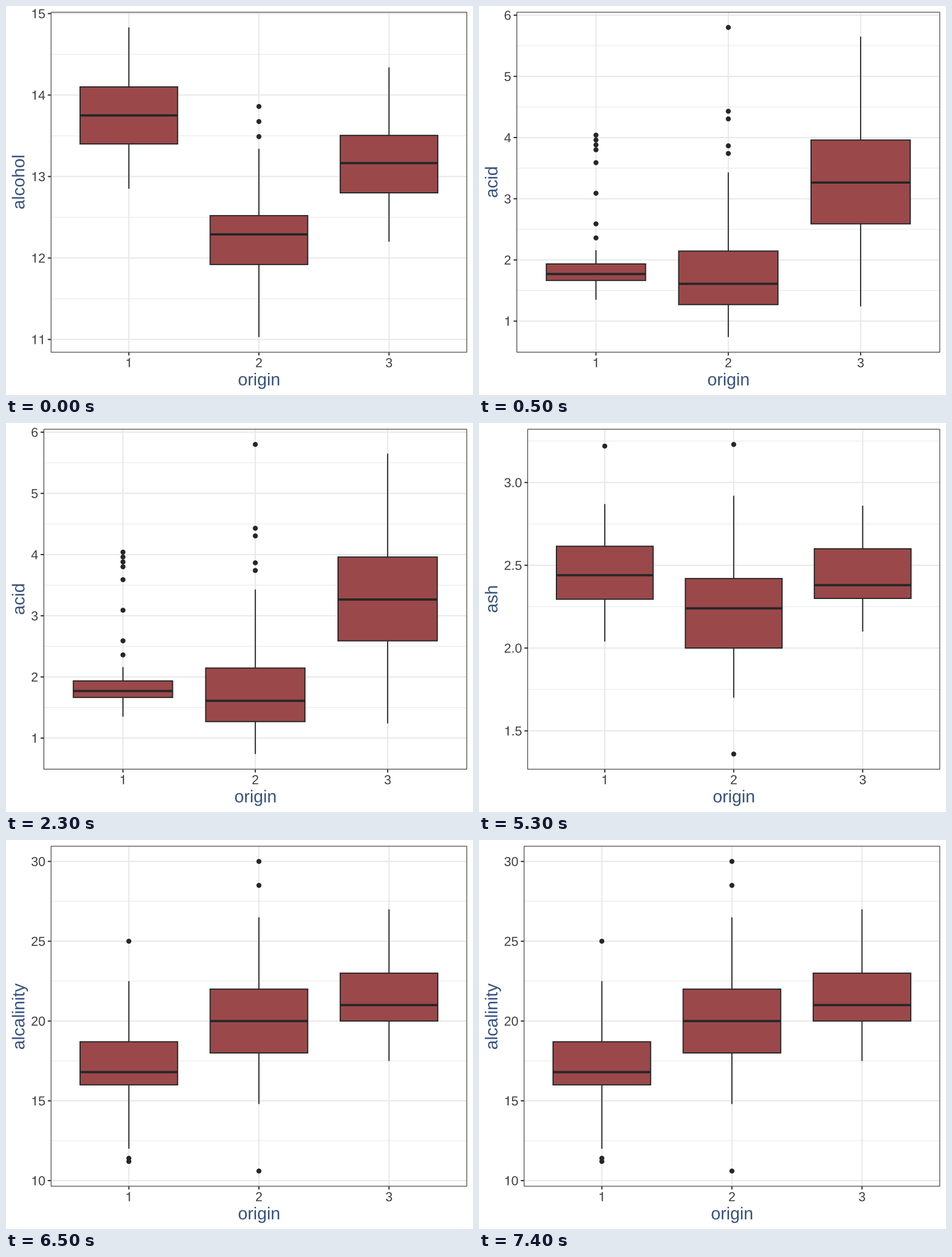
Recreate the animation shown at these times as a matplotlib script. Size 820 px wide and 683 px high, loop 8000 ms.

```python
import matplotlib.pyplot as plt
import numpy as np
from matplotlib.animation import FuncAnimation
from matplotlib.patches import Circle, PathPatch, Rectangle
from matplotlib.path import Path
from matplotlib.textpath import TextPath
from matplotlib.transforms import Affine2D

W, H, DPI = 820, 683, 64
PT = 72 / DPI  # points per pixel
TOP, BOTTOM, RIGHT = 10.45, 608.4, 809.55
LABEL_X, LABEL_GAP, TICK = 43.9, 9.4, 5.2
THIN, LINE, THICK = 1.0, 2.0, 4.0
LABEL_SIZE, TITLE_SIZE = 22.8, 30.4
DIGIT, DOT = 0.556, 0.278  # advance widths in em

INK, FILL = "#262727", "#9b484a"
GRID, LABEL, TITLE = "#e7e7e7", "#404040", "#36527f"

STEP, HOLD, FIRST, LOOP = 500, 3000, 500, 8000

# A "1" without a foot, in em units
ONE = Path([(.10, .50), (.27, .50), (.27, 0), (.36, 0),
            (.36, .71), (.29, .71), (.25, .58), (.10, .565)])


def box(low, q1, median, q3, high, *outliers):
    return low, q1, median, q3, high, outliers


# Title, gap between ticks, one box per origin
CHARTS = [
    ("alcohol", 1,
     box(12.85, 13.4, 13.75, 14.1, 14.83),
     box(11.03, 11.92, 12.29, 12.52, 13.34, *np.linspace(13.49, 13.86, 3)),
     box(12.2, 12.8, 13.165, 13.505, 14.34)),
    ("acid", 1,
     box(1.35, 1.665, 1.77, 1.935, 2.16, 2.36,
         *np.linspace(2.59, 3.59, 3), *np.linspace(3.8, 4.04, 4)),
     box(0.74, 1.27, 1.61, 2.145, 3.43, 3.74, 3.865, 4.305, 4.43, 5.8),
     box(1.24, 2.59, 3.265, 3.96, 5.65)),
    ("ash", 0.5,
     box(2.04, 2.295, 2.44, 2.615, 2.87, 3.22),
     box(1.7, 2, 2.24, 2.42, 2.92, 1.36, 3.23),
     box(2.1, 2.3, 2.38, 2.6, 2.86)),
    ("alcalinity", 5,
     box(12, 16, 16.8, 18.7, 22.5, 11.2, 11.4, 25),
     box(14.8, 18, 20, 22, 26.5, 10.6, 28.5, 30),
     box(17.5, 20, 21, 23, 27)),
]

fig = plt.figure(figsize=(W / DPI, H / DPI), dpi=DPI, facecolor="white")
ax = fig.add_axes([0, 0, 1, 1])


def line(x0, y0, x1, y1, color=INK, width=LINE):
    # The same zorder as patches, so that drawing order decides
    ax.plot([x0, x1], [y0, y1], color=color, lw=width * PT,
            solid_capstyle="butt", snap=False, zorder=1)


def rect(x0, y0, x1, y1, width, fill="none"):
    ax.add_patch(Rectangle((x0, y0), x1 - x0, y1 - y0, fc=fill, ec=INK,
                           lw=width * PT, joinstyle="miter", snap=False))


def shape(path, x, y, size, color, turn=0):
    place = Affine2D().scale(size, -size).rotate_deg(turn).translate(x, y)
    ax.add_patch(PathPatch(place.transform_path(path), fc=color, lw=0, snap=False))


def glyphs(text):
    return TextPath((0, 0), text, size=1, prop={"family": "Liberation Sans"})


def number_width(text):
    return sum(DOT if c == "." else DIGIT for c in text) * LABEL_SIZE


def number(text, x, y):
    for c in text:
        shape(ONE if c == "1" else glyphs(c), x, y, LABEL_SIZE, LABEL)
        x += number_width(c)


def title(text, x, y, turn=0):
    path = glyphs(text)
    extent = path.get_extents()
    half = (extent.x0 + extent.x1) / 2 * TITLE_SIZE
    if turn:
        y += half
    else:
        x -= half
    shape(path, x, y, TITLE_SIZE, TITLE, turn)


def draw_chart(name, gap, *boxes):
    values = [v for b in boxes for v in (b[0], b[4], *b[5])]
    pad = (max(values) - min(values)) * 0.05
    low, high = min(values) - pad, max(values) + pad
    ticks = np.arange(np.ceil(low / gap), high / gap) * gap
    labels = [f"{t:.{int(gap < 1)}f}" for t in ticks]

    left = LABEL_X + number_width(labels[0]) + LABEL_GAP
    unit = (RIGHT - left) / 3.2
    centers = left + unit * np.array([0.6, 1.6, 2.6])

    def ypos(v):
        return BOTTOM - (v - low) / (high - low) * (BOTTOM - TOP)

    # Grid
    for v in [ticks[0] - gap / 2, *(ticks + gap / 2)]:
        if low < v < high:
            line(left, ypos(v), RIGHT, ypos(v), GRID, THIN)
    for t in ticks:
        line(left, ypos(t), RIGHT, ypos(t), GRID)
    for x in centers:
        line(x, TOP, x, BOTTOM, GRID)

    # Boxes
    for x, (lo, q1, median, q3, hi, outliers) in zip(centers, boxes):
        x0, x1 = x - 0.375 * unit, x + 0.375 * unit
        for v in outliers:
            ax.add_patch(Circle((x, ypos(v)), 4.4, fc=INK, lw=0))
        line(x, ypos(lo), x, ypos(q1))
        line(x, ypos(q3), x, ypos(hi))
        rect(x0, ypos(q3), x1, ypos(q1), LINE, FILL)
        line(x0, ypos(median), x1, ypos(median), width=THICK)

    # Frame, ticks and text
    rect(left + 0.5, TOP + 0.5, RIGHT - 0.5, BOTTOM - 0.5, 1.1)
    for t, label in zip(ticks, labels):
        line(left - TICK, ypos(t), left, ypos(t))
        number(label, LABEL_X, ypos(t) + 8.1)
    for i, x in enumerate(centers):
        line(x, BOTTOM, x, BOTTOM + TICK)
        number(str(i + 1), x - DIGIT * LABEL_SIZE / 2, 634.2)
    title("origin", (left + RIGHT) / 2, 666.1)
    title(name, 32.3, (TOP + BOTTOM) / 2, -90)


def update(i):
    ax.clear()
    ax.set_axis_off()
    draw_chart(*CHARTS[(i * STEP - FIRST) // HOLD + 1])
    ax.set_xlim(0, W)
    ax.set_ylim(H, 0)
    return []


anim = FuncAnimation(fig, update, frames=LOOP // STEP, interval=STEP,
                     init_func=lambda: [], repeat=True, repeat_delay=0, blit=False)
plt.show()
```
